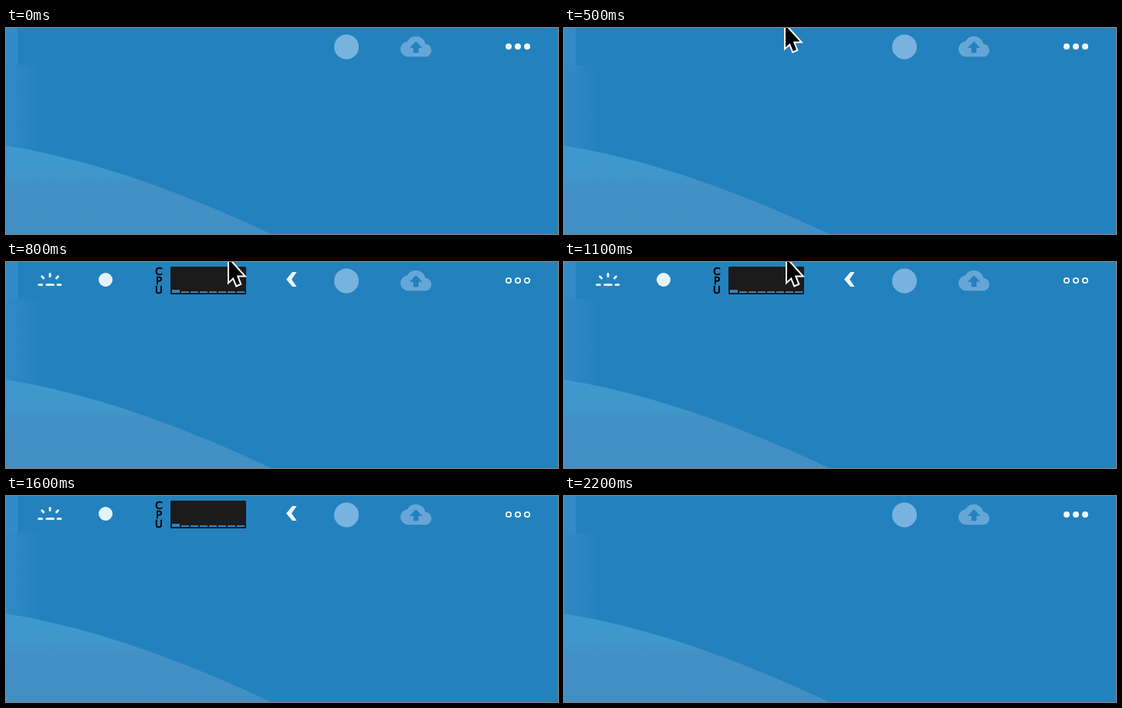
These frames come from a looping animation (715x267 px, 2.4 s). An HTML page:

```html
<!DOCTYPE html>
<html lang="en">
<head>
<meta charset="utf-8">
<title>Menu bar reveal</title>
<style>
  html, body { margin: 0; width: 100%; height: 100%; overflow: hidden; background: #2381be; }
  svg { display: block; width: 715px; height: 267px; }
  text { font: 13.5px "DejaVu Sans", sans-serif; text-anchor: middle; stroke: #000; stroke-width: .7; }
</style>
</head>
<body>
<svg viewBox="0 0 715 267">
  <defs>
    <linearGradient id="hill" x1="0" y1="0" x2="0" y2="1">
      <stop offset="0" stop-color="#3f98cd"/>
      <stop offset=".33" stop-color="#4097cb"/>
      <stop offset=".45" stop-color="#4290c5"/>
      <stop offset="1" stop-color="#428fc4"/>
    </linearGradient>
    <linearGradient id="haze">
      <stop offset="0" stop-color="#3089c4"/>
      <stop offset=".5" stop-color="#2a86c1"/>
      <stop offset="1" stop-color="#2381be"/>
    </linearGradient>
  </defs>

  <rect width="715" height="267" fill="#2381be"/>
  <rect y="48" width="46" height="120" fill="url(#haze)"/>
  <rect width="15" height="48" fill="#328bc6"/>
  <path d="M0 152.5Q150 176 343.5 267H0Z" fill="url(#hill)"/>

  <circle cx="441" cy="24.5" r="16" fill="#78b3de"/>
  <path transform="translate(511 4) scale(1.667)" fill="#66a6d6" d="M19.35 10.04C18.67 6.59 15.64 4 12 4 9.11 4 6.6 5.64 5.35 8.04 2.34 8.36 0 10.91 0 14c0 3.31 2.69 6 6 6h13c2.76 0 5-2.24 5-5 0-2.64-2.05-4.78-4.65-4.96zM14 13v4h-4v-4H7l5-5 5 5z"/>
  <g id="dots" stroke="#eef7fd"></g>

  <g id="extras">
    <path d="M42.6 29.6h3.8M52.8 29.6h8.6M67 29.6h3.8M57 15.6v3M46.6 18.8l2 2.2M67.4 18.8l-2 2.2" fill="none" stroke="#e6f3fc" stroke-width="3" stroke-linecap="round"/>
    <circle cx="129" cy="23" r="9" fill="#e6f3fc"/>
    <text x="198" y="17">C</text>
    <text x="198" y="29">P</text>
    <text x="198" y="41">U</text>
    <rect x="213" y="6" width="98" height="36" rx="1.5" fill="#1b1b1b"/>
    <g id="bars" fill="#2f86c1"></g>
    <path d="M371 13H376.5L370 22.5 376.5 32H371L363 22.5Z" fill="#eef7fd"/>
  </g>

  <path id="cursor" d="M0 -2V26L5.6 20.8 9.8 31 14 29.2 9.8 18.5H18.5Z" fill="#000" stroke="#fff" stroke-width="4" paint-order="stroke"/>
</svg>
<script>
const LOOP = 2400, STEP = 100;
const SHOW = 600, HIDE = 1800;
const [dots, extras, bars, cursor] =
  ["dots", "extras", "bars", "cursor"].map(id => document.getElementById(id));

function add(parent, tag, attrs) {
  const el = document.createElementNS("http://www.w3.org/2000/svg", tag);
  for (const key in attrs) el.setAttribute(key, attrs[key]);
  parent.append(el);
}

for (let i = 0; i < 3; i++) add(dots, "circle", { cx: 651 + 12 * i, cy: 24, r: 3.2 });
for (let i = 0; i < 8; i++) {
  const height = i ? 2 : 4;
  add(bars, "rect", { x: 215 + 12 * i, y: 40 - height, width: 10, height });
}

// Pointer tip as [time, x, y]; the pointer is away outside this span.
const path = [
  [200, 252, 186], [300, 264, 98], [400, 279, 27], [500, 287, -1],
  [600, 289, -1], [1100, 289, -1], [1200, 286, 14],
  [1300, 274, 82], [1400, 256, 180], [1500, 243, 264], [1600, 243, 264]
];

function pointerAt(t) {
  const next = path.findIndex(key => key[0] > t);
  if (next < 1) return null;
  const [t0, x0, y0] = path[next - 1], [t1, x1, y1] = path[next];
  const k = (t - t0) / (t1 - t0);
  return [x0 + (x1 - x0) * k, y0 + (y1 - y0) * k];
}

function draw(ms) {
  const t = Math.floor((ms % LOOP) / STEP) * STEP;
  const open = t >= SHOW && t < HIDE;
  extras.setAttribute("visibility", open ? "visible" : "hidden");
  dots.setAttribute("fill", open ? "none" : "#eef7fd");
  dots.setAttribute("stroke-width", open ? 1.8 : 1.6);

  const tip = pointerAt(t);
  cursor.setAttribute("visibility", tip ? "visible" : "hidden");
  if (tip) cursor.setAttribute("transform", `translate(${tip})`);
}

const start = performance.now();
function tick() {
  draw(performance.now() - start);
  requestAnimationFrame(tick);
}
tick();
</script>
</body>
</html>
```
